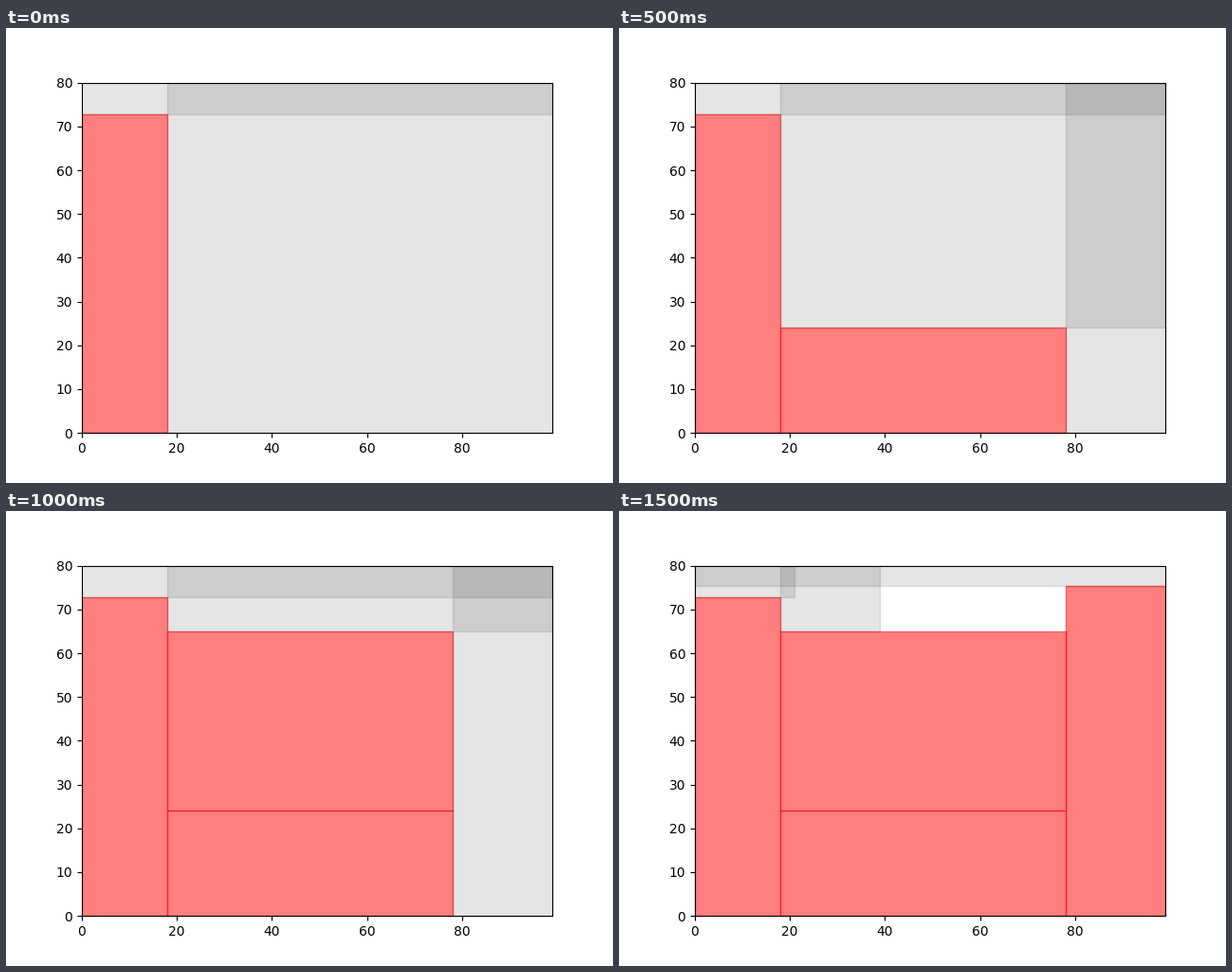
Write a matplotlib script that moves like this. It is 640 px wide and 480 px high and loops after 2 s.

```python
import matplotlib.pyplot as plt
from matplotlib.animation import FuncAnimation
from matplotlib.patches import Rectangle

WIDTH, HEIGHT = 99, 80
LEFT_TOP, RIGHT_TOP = 72.75, 75.4

# Packed boxes in order of placement: x, y, width, height
BOXES = [
    (0, 0, 18, LEFT_TOP),
    (18, 0, 60, 24),
    (18, 24, 60, 41),
    (78, 0, 21, RIGHT_TOP),
]

# Free spaces after each placement: left, bottom, right (all reach the top)
SPACES = [
    [(0, LEFT_TOP, WIDTH), (18, 0, WIDTH)],
    [(0, LEFT_TOP, WIDTH), (18, 24, WIDTH), (78, 0, WIDTH)],
    [(0, LEFT_TOP, WIDTH), (18, 65, WIDTH), (78, 0, WIDTH)],
    [(0, LEFT_TOP, 21), (18, 65, 39), (0, RIGHT_TOP, WIDTH)],
]

fig, ax = plt.subplots(figsize=(6.4, 4.8), dpi=100)
ax.set_xlim(0, WIDTH)
ax.set_ylim(0, HEIGHT)


def add_rect(x, y, w, h, color, alpha):
    ax.add_patch(Rectangle((x, y), w, h, color=color, alpha=alpha))


def draw(step):
    for patch in list(ax.patches):
        patch.remove()
    for box in BOXES[:step + 1]:
        add_rect(*box, "red", 0.5)
    for left, bottom, right in SPACES[step]:
        add_rect(left, bottom, right - left, HEIGHT - bottom, "black", 0.1)
    return ax.patches


anim = FuncAnimation(fig, draw, frames=len(BOXES), init_func=lambda: draw(0),
                     interval=500, repeat=True, repeat_delay=0)
plt.show()
```
